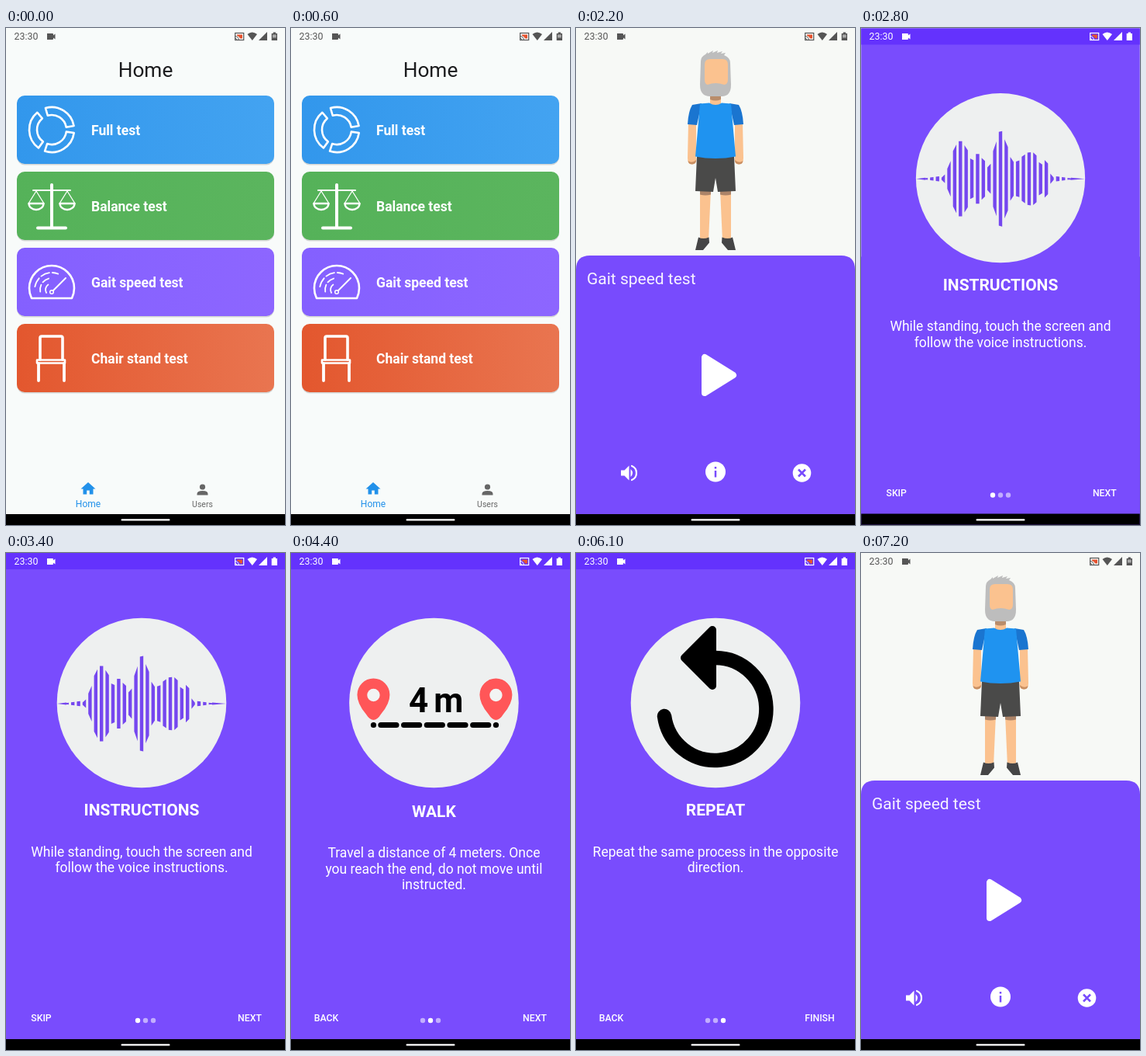
An HTML page for the animation above (7.3 s loop, 360 by 640 pixels).

```html
<!DOCTYPE html>
<html lang="en">
<head>
<meta charset="utf-8">
<title>Gait speed test</title>
<style>
  html, body { margin: 0; width: 100%; height: 100%; overflow: hidden; background: #000; }
  svg { display: block; width: 360px; height: 640px; font-family: Roboto, sans-serif; }
  .line { fill: none; stroke: #fff; stroke-linecap: round; stroke-linejoin: round; }
  .mid { text-anchor: middle; }
  .title { font-size: 21px; font-weight: 700; }
  .body { font-size: 17.5px; }
  .button { font-size: 12.25px; font-weight: 500; }
</style>
</head>
<body>
<svg viewBox="0 0 360 640">
  <defs id="gradients"></defs>

  <g id="home">
    <rect width="360" height="640" fill="#f8fbfa"/>
    <text class="mid" x="180" y="63" font-size="26.25" fill="#1c1c1e">Home</text>
    <g id="cards"></g>
    <g fill="#2291ea">
      <path d="M106 585l-9.500 8.500h3v7h4.700v-5h3.600v5h4.700v-7h3z"/>
      <text class="mid" x="106" y="617" font-size="12">Home</text>
    </g>
    <g fill="#666">
      <circle cx="253.500" cy="591" r="3.600"/>
      <path d="M246.500 601.500v-1.500q0-4 7-4t7 4v1.500z"/>
      <text class="mid" x="253.500" y="617" font-size="10.500">Users</text>
    </g>
    <rect y="626" width="360" height="14"/>
  </g>
  <rect id="homeVeil" width="360" height="640"/>

  <g id="gait">
    <rect width="360" height="640" fill="#f7f9f6"/>
    <g id="man">
      <g fill="#fbc28f">
        <path d="M173 80h14v20h-14z"/>
        <path id="arm" d="M145 122h10l0 44q2 9-5 9.500q-6 0-6-8z"/>
        <path id="leg" d="M160 208h14l-3 66h-11z"/>
      </g>
      <path d="M173 85h14v7q-7 3-14 0z" fill="#b98d6b"/>
      <path d="M161 43q0-6 6-9l3-3v2l7-4-1 3 7-3-1 3 7-2-2 3 6-1-2 3q8 3 8 10l1 28q0 15-12 15h-15q-13 0-13-15z" fill="#bdbdbd"/>
      <path d="M166 47q0-7 7-7h16q7 0 7 7v19q0 7-5 7q-11-4-21 0q-4 0-4-7z" fill="#fbc28f"/>
      <path id="hand" d="M144.500 171q5 4 10.500-1q0 5-5 5.500q-5 0-5.500-4.500z" fill="#c98f62"/>
      <path id="cuff" d="M160 210h14v4.500q-7 2-14 0z" fill="#ad8468"/>
      <path id="sleeve" d="M150 99l12-2-6 28-12-1q1-17 6-25z" fill="#1a75d0"/>
      <path d="M156 165h48l2 45-23 1-3-18-3 18-23-1z" fill="#4a4a49"/>
      <path d="M160 97.500l12-1q8 5 16 0l12 1 6 68q-26 5-52 0z" fill="#1f93f0"/>
      <path id="shoe" d="M158 269.500q6 3 13.500 0l.5 7-8 9.500h-10z" fill="#454546"/>
    </g>
    <path d="M0 626V311q0-18 18-18H342q18 0 18 18V626z" fill="#784bfd"/>
    <text x="14" y="330" font-size="21" fill="#f7f3ff">Gait speed test</text>
    <g fill="#fff">
      <path d="M166 424v46l37-23z" stroke="#fff" stroke-width="8" stroke-linejoin="round"/>
      <path d="M58 569.500h4.500l6-6v19l-6-6H58z"/>
      <path d="M70.500 568q5 5 0 10z"/>
      <path class="line" d="M72 564q6 2.500 6 9t-6 9" stroke-width="2.200"/>
      <circle cx="180" cy="571.500" r="13"/>
      <circle cx="291.500" cy="573" r="11.800"/>
    </g>
    <g stroke="#784bfd" stroke-width="2.500">
      <path d="M180 570v8.500M180 565v2.600"/>
      <path d="M287 568.500l9 9m0-9l-9 9"/>
    </g>
    <rect y="626" width="360" height="14"/>
  </g>
  <rect id="gaitVeil" width="360" height="640"/>

  <g id="intro" fill="#fff">
    <rect width="360" height="640" fill="#794cfd"/>
    <rect width="360" height="21" fill="#6432fd"/>
    <g id="pages"></g>
    <text class="button mid" id="back" x="45.500" y="603"></text>
    <text class="button mid" id="next" x="314.500" y="603"></text>
    <g id="dots">
      <circle cx="170" cy="602" r="3.200"/><circle cx="180" cy="602" r="3.200"/><circle cx="190" cy="602" r="3.200"/>
    </g>
    <rect y="626" width="360" height="14" fill="#000"/>
  </g>

  <g id="status" fill="currentColor">
    <text x="10.500" y="15.300" font-size="12.400">23:30</text>
    <path d="M53 7h7q1 0 1 1v1.500l2.500-2v7l-2.500-2v1.500q0 1-1 1h-7z"/>
    <rect x="295.700" y="6.500" width="11" height="9" fill="none" stroke="currentColor" stroke-width="1.200"/>
    <path d="M298 8.500h7v5h-3q-1-3-4-3.500z" fill="#e5532f"/>
    <path d="M295 10.500q5 0 5.500 5.500M295 13q2.500 0 3 3" fill="none" stroke="currentColor"/>
    <path d="M311.500 8q6-5 12.500 0l-6.200 8z"/>
    <path d="M337 5v11h-11z"/>
    <path d="M342.700 7h2v-1.500h3.300V7h2v9h-7.300z"/>
    <path d="M344 8.500h4.700v4H344z" fill="#fff" opacity=".5"/>
  </g>
  <rect x="148.500" y="632.300" width="63" height="2.200" rx="1.100" fill="#fff"/>
</svg>

<script>
const LOOP = 7300, TICK = 100;
const $ = id => document.getElementById(id);
const clamp = x => Math.min(1, Math.max(0, x));
const polar = (cx, cy, r, deg) => {
  const a = deg * Math.PI / 180;
  return `${(cx + r * Math.cos(a)).toFixed(2)} ${(cy + r * Math.sin(a)).toFixed(2)}`;
};
const arc = (cx, cy, r, from, to) =>
  `M${polar(cx, cy, r, from)}A${r} ${r} 0 ${to - from > 180 ? 1 : 0} 1 ${polar(cx, cy, r, to)}`;
const line = (d, width) => `<path class="line" d="${d}" stroke-width="${width}"/>`;

// Home cards
const sector = (from, to) => line(
  `${arc(59, 131, 29, from, to)}L${polar(59, 131, 19, to)}A19 19 0 0 0 ${polar(59, 131, 19, from)}Z`, 2.6);
const pan = x => line(`M${x} 210l-10 16h20z`, 1.3) + line(`M${x - 9.500} 226a9.500 8 0 0 0 19 0z`, 2.4);
const cards = [
  ['Full test', '#3297ec', '#43a3f1', sector(-106, -10) + sector(8, 108) + sector(126, 230)],
  ['Balance test', '#55b259', '#5bb55e',
    line('M59 202V257', 4) + line('M41 257.500H77', 4) + line('M35 209H83', 2) + pan(39) + pan(79)],
  ['Gait speed test', '#8460ff', '#8d66ff',
    line('M33 348Q30 342 30 335A29 29 0 0 1 88 335Q88 342 85 348Z', 2.6) +
    [[22, 190, 222], [22, 232, 262], [22, 272, 292], [15, 170, 205], [15, 220, 255], [8, 150, 235]]
      .map(([r, from, to]) => line(arc(59, 337, r, from, to), 1.8)).join('') +
    line('M61 338L77 322', 2) + '<circle cx="59" cy="340" r="2.300" class="line" stroke-width="1.500"/>'],
  ['Chair stand test', '#e3572e', '#e97550',
    line('M44 427V399q0-2 2-2H71q2 0 2 2V427', 3.6) + line('M40 427.500H76v4H40z', 2.6) +
    line('M42 432V454M75 432V454', 3.8)]
];
cards.forEach(([label, left, right, icon], i) => {
  const y = 87 + 98 * i;
  $('gradients').innerHTML += `<linearGradient id="card${i}">
    <stop stop-color="${left}"/><stop offset="1" stop-color="${right}"/></linearGradient>`;
  $('cards').innerHTML += `<rect x="14" y="${y + 1.500}" width="332" height="88" rx="10" opacity=".15"/>
    <rect x="14" y="${y}" width="332" height="88" rx="10" fill="url(#card${i})"/>${icon}
    <text x="110" y="${y + 51}" font-size="17.500" font-weight="700" fill="#fff">${label}</text>`;
});

// The right half of the man mirrors the left half
for (const id of ['arm', 'leg', 'hand', 'cuff', 'sleeve', 'shoe']) {
  const twin = $(id).cloneNode();
  twin.removeAttribute('id');
  twin.setAttribute('transform', 'translate(360) scale(-1 1)');
  $(id).after(twin);
}

// Introduction pages, each drawn around x = 0
const heights = [2, 4, 6, 7, 36, 80, 97, 80, 50, 64, 50, 34, 84, 122, 92, 50, 46, 60, 68, 64, 40, 44, 8, 6, 4, 2];
const wave = heights.map((h, i) => {
  const x = (i - 13) * 7.4, slope = ((heights[i + 1] || 0) - (heights[i - 1] || 0)) * .07;
  const a = Math.max(.8, h / 2 - slope), b = Math.max(.8, h / 2 + slope);
  return `M${x - 2.2} ${194 - a}L${x + 2.2} ${194 - b}V${194 + b}L${x - 2.2} ${194 + a}Z`;
}).join('');
const pin = x => `<path d="M${x} 215q-5 0-10-8q-11-13-11-24.500a21 21 0 0 1 42 0q0 11.500-11 24.500q-5 8-10 8z" fill="#ff5658"/>
  <circle cx="${x}" cy="183" r="8.200" fill="#f2f4f3"/>`;
const pages = [
  ['INSTRUCTIONS', 338, ['While standing, touch the screen and', 'follow the voice instructions.'],
    `<path d="${wave}M-109 194l12-1.500v3zM109 194l-18-1.500v3z" fill="#7547ef"/>`],
  ['WALK', 339.5, ['Travel a distance of 4 meters. Once', 'you reach the end, do not move until', 'instructed.'],
    pin(-78) + pin(80) +
    `<text x="-32.500" y="205" font-size="44" font-weight="700" word-spacing="-4" fill="#000">4 m</text>
     <path class="line" style="stroke:#000" stroke-width="7.200" d="M-78 221.500h.1M-68.500 221.500h20m9.700 0h20m9.700 0h20m9.700 0h20m9.700 0h20M80 221.500h.1"/>`],
  ['REPEAT', 338, ['Repeat the same process in the opposite', 'direction.'],
    `<path class="line" style="stroke:#000" stroke-width="18.500" d="M-66 210A66 66 0 1 0 0 135"/>
     <path d="M-40 135L-4 99V171z" stroke="#000" stroke-width="10" stroke-linejoin="round"/>`]
];
$('pages').innerHTML = pages.map(([title, y, lines, art], i) => `<g transform="translate(${180 + 360 * i})">
  <circle cy="193" r="109.300" fill="#eef0f0"/><g fill="#000">${art}</g>
  <text class="title mid" y="${y}">${title}</text>
  ${lines.map((s, n) => `<text class="body mid" y="${y + 52.5 + 20.5 * n}">${s}</text>`).join('')}</g>`).join('');

// Decelerating curve: cubic-bezier(.05, .7, .1, 1)
function decelerate(x) {
  if (x <= 0 || x >= 1) return clamp(x);
  const curve = (u, a, b) => 3 * a * u * (1 - u) ** 2 + 3 * b * u * u * (1 - u) + u ** 3;
  let low = 0, high = 1;
  for (let i = 0; i < 20; i++) {
    const u = (low + high) / 2;
    if (curve(u, .05, .1) < x) low = u; else high = u;
  }
  return curve(low, .7, 1);
}
const settle = x => 1 - (1 - clamp(x)) ** 5;

function scroll(t) {
  if (t < 3400) return 0;
  if (t < 4000) return 5;
  if (t < 4080) return 75;
  if (t < 5200) return 160 + 200 * settle((t - 4080) / 600);
  if (t < 5500) return 365;
  return 546 + 174 * settle((t - 5500) / 600);
}

function show(id, scale, alpha = 1) {
  const el = $(id);
  el.setAttribute('transform', `translate(180 320) scale(${scale}) translate(-180 -320)`);
  el.setAttribute('opacity', alpha);
  el.style.display = alpha > 0 ? '' : 'none';
}

function render(t) {
  const GAIT = 805, INTRO = 2505, CLOSE = 6750;
  const phase = start => decelerate((t - start) / 400);
  const fade = start => clamp((t - start) / 83);
  const gait = phase(GAIT), intro = phase(INTRO), close = phase(CLOSE);

  show('home', 1 + .04 * gait, t < 1300 ? 1 : 0);
  show('homeVeil', 1, t > GAIT && t < 1300 ? .1 : 0);
  show('gait', .85 + .15 * gait + .04 * (intro - close), fade(GAIT));
  show('gaitVeil', 1, t > INTRO ? .1 * (1 - close) : 0);
  show('intro', .85 + .15 * intro - .1 * close, fade(INTRO) * (1 - fade(CLOSE + 35)));

  const page = t < 4080 ? 0 : t < 5500 ? 1 : 2;
  $('pages').setAttribute('transform', `translate(${-scroll(t)})`);
  $('back').textContent = page ? 'BACK' : 'SKIP';
  $('next').textContent = page < 2 ? 'NEXT' : 'FINISH';
  [...$('dots').children].forEach((dot, i) => dot.setAttribute('opacity', i === page ? 1 : .55));
  $('status').style.color = t > INTRO && t < CLOSE ? '#fff' : '#555';
}

const began = performance.now();
function frame() {
  const t = (performance.now() - began) % LOOP;
  render(Math.floor(t / TICK) * TICK);
  requestAnimationFrame(frame);
}
frame();
</script>
</body>
</html>
```
